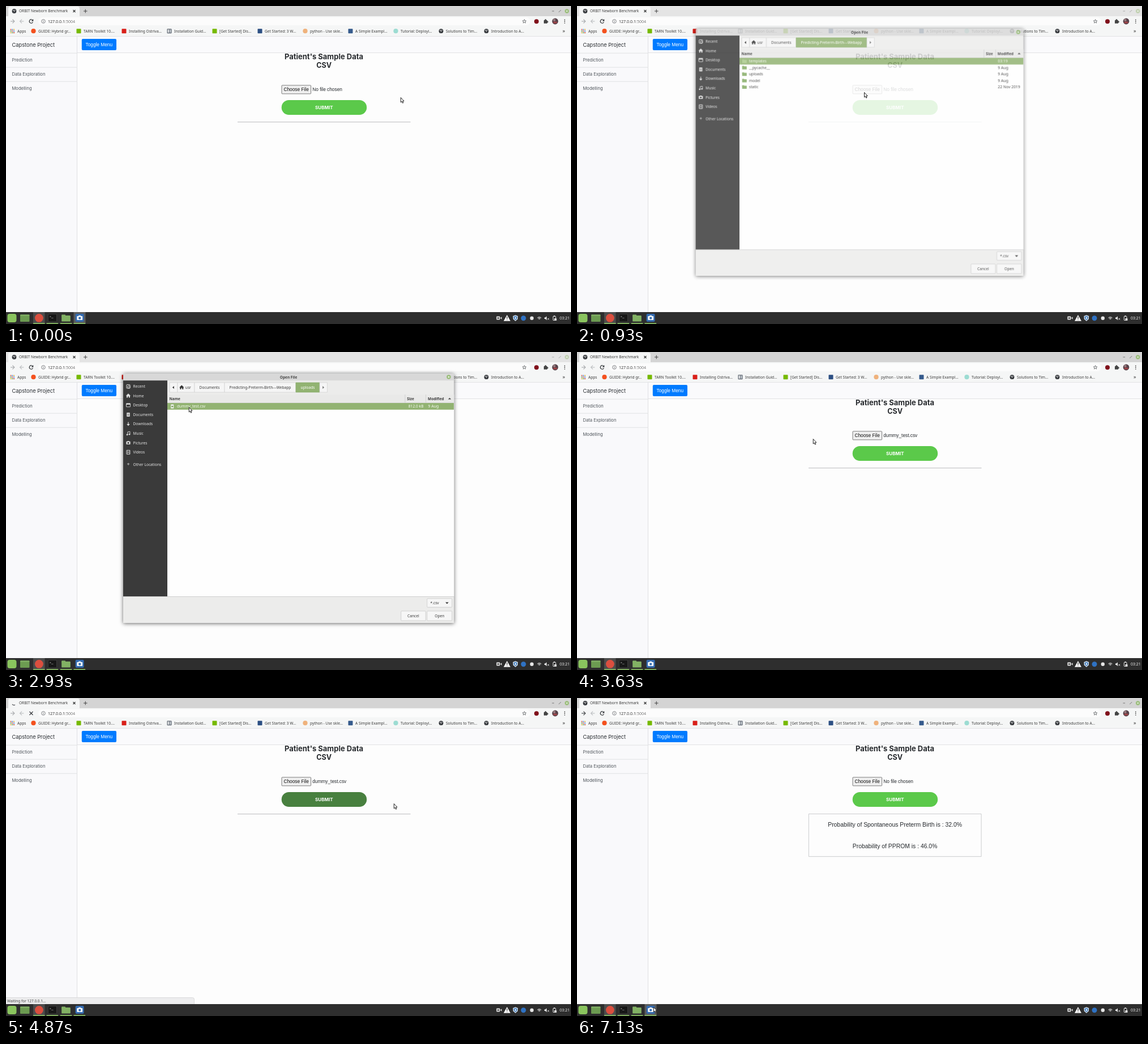
Animation of 998x561 px, one loop 7210 ms. Source, as an HTML page with a canvas:

```html
<!DOCTYPE html>
<html lang="en">
<head>
<meta charset="utf-8">
<title>Sample upload</title>
<style>
html, body { margin: 0; width: 100%; height: 100%; overflow: hidden; background: #fdfdfd; }
canvas { display: block; width: 998px; height: 561px; }
</style>
</head>
<body>
<canvas id="stage" width="998" height="561"></canvas>
<script>
const W = 998, H = 561, LOOP = 7210;
const UI = '"Noto Sans", sans-serif';
const GEO = 'Inter, sans-serif';
const PAGE = '"Liberation Sans", Arial, sans-serif';
const GREEN = '#92b372', INK = '#3c3c3c';

const screen = document.getElementById('stage').getContext('2d');
const layer = document.createElement('canvas');
layer.width = W;
layer.height = H;
const layerCtx = layer.getContext('2d');
let g = screen;

const clamp = v => Math.max(0, Math.min(1, v));
const progress = (t, from, length) => clamp((t - from) / length);
const smooth = p => p * p * (3 - 2 * p);
const easeOut = p => 1 - (1 - p) ** 2;

function rect(x, y, w, h, fill, r = 0, stroke, lineWidth = 0.7) {
  g.beginPath();
  g.roundRect(x, y, w, h, r);
  if (fill) { g.fillStyle = fill; g.fill(); }
  if (stroke) { g.strokeStyle = stroke; g.lineWidth = lineWidth; g.stroke(); }
}

function disc(x, y, r, fill) {
  g.beginPath();
  g.arc(x, y, r, 0, 7);
  g.fillStyle = fill;
  g.fill();
}

function ring(x, y, r, color, width = 1, from = 0, to = 2 * Math.PI) {
  g.beginPath();
  g.arc(x, y, r, from, to);
  g.strokeStyle = color;
  g.lineWidth = width;
  g.stroke();
}

// Points are offsets from (x, y); a fill closes the shape.
function path(x, y, points, { fill, stroke, width = 1 }) {
  g.beginPath();
  for (let i = 0; i < points.length; i += 2) g.lineTo(x + points[i], y + points[i + 1]);
  if (fill) { g.closePath(); g.fillStyle = fill; g.fill(); }
  if (stroke) { g.strokeStyle = stroke; g.lineWidth = width; g.stroke(); }
}

// y is the middle of the capital letters.
function text(s, x, y, size, color = INK, { font = UI, weight = 400, align = 'left' } = {}) {
  g.font = `${weight} ${size}px ${font}`;
  g.textAlign = align;
  g.fillStyle = color;
  g.fillText(s, x, y + size * 0.355);
}

const cross = (x, y, r, color, width = 1) => {
  path(x, y, [-r, -r, r, r], { stroke: color, width });
  path(x, y, [-r, r, r, -r], { stroke: color, width });
};

function globe(x, y) {
  disc(x, y, 3.9, '#33363a');
  path(x, y, [-2.6, -1.2, -0.4, -1.4, 0.6, 0.3, -0.8, 1.7], { stroke: '#f4f4f4', width: 1 });
  path(x, y, [1, -2.4, 2.2, -0.6], { stroke: '#f4f4f4', width: 0.9 });
}

function arrow(x, y, dir, color) {
  path(x, y, [3.4 * dir, 0, -3.4 * dir, 0], { stroke: color, width: 1.1 });
  path(x, y, [0, -3.3, -3.4 * dir, 0, 0, 3.3], { stroke: color, width: 1.1 });
}

const bookmarks = [
  ['GUIDE: Hybrid gr…', '#f4511e', 'disc'],
  ['TARN Toolkit 10.…', '#76b900', 'box'],
  ['Installing Ostriva…', '#d9201a', 'box'],
  ['Installation Guid…', '#5d6570', 'doc'],
  ['[Get Started] Dis…', '#76b900', 'box'],
  ['Get Started: 3 W…', '#2c4f83', 'box'],
  ['python - Use skle…', '#efb27c', 'disc'],
  ['A Simple Exampl…', '#355a8c', 'box'],
  ['Tutorial: Deployi…', '#9cdcd2', 'disc'],
  ['Solutions to Tim…', '', 'globe'],
  ['Introduction to A…', '', 'globe']
];

function drawBookmark([label, color, kind], i) {
  const x = 48.5 + 80 * i, y = 44.2;
  if (kind === 'disc') disc(x, y, 4.1, color);
  else if (kind === 'globe') globe(x, y);
  else rect(x - 4, y - 4, 8, 8, color, 0.8);
  if (kind === 'doc') {
    rect(x - 2.8, y - 2.8, 2.2, 5.6, '#f0f0f0');
    rect(x + 0.4, y - 2.8, 2.4, 5.6, '#c4cad0');
  }
  text(label, x + 8.5, y, 6.6);
}

function drawBrowser(s) {
  rect(0, 0, W, 18, s.active ? '#d4d4d4' : '#e4e4e4');
  rect(4, 1, 126, 20, '#f5f6f6', [4, 4, 0, 0]);
  rect(0, 18, W, 36, '#f5f6f6');
  if (s.loading) {
    const a = -s.t / 160;
    ring(14, 9, 3.6, '#45484c', 1.1, a, a + 1.6);
  } else globe(14.5, 9);
  text('ORBIT Newborn Benchmark', 23, 9, 6.55);
  cross(120.5, 9, 2, '#333', 1.1);
  path(140.3, 9, [-3.3, 0, 3.3, 0], { stroke: '#444' });
  path(140.3, 9, [0, -3.3, 0, 3.3], { stroke: '#444' });

  const tool = s.active ? '#777' : '#aaa';
  path(966.3, 9, [-1.8, 0, 1.8, 0], { stroke: tool });
  path(978.3, 9, [-2, 2, 2, -2], { stroke: tool });
  disc(990.7, 9, 3.7, s.active ? '#98bc78' : '#bfcfb0');
  cross(990.7, 9, 1.4, '#fff', 0.9);

  arrow(11.5, 27, -1, s.done ? '#3a3d40' : '#a5a7a9');
  arrow(28, 27, 1, '#bcbec0');
  if (s.loading) cross(44.5, 27, 3, '#3a3d40', 1.2);
  else {
    ring(44.5, 27, 3.2, '#3a3d40', 1.2, 0.4, 5.5);
    path(48.3, 23, [0, 0, 0, 3.7, -3.7, 3.7], { fill: '#3a3d40' });
  }
  rect(57, 20, 869, 14, '#fcfcfc', 7);
  ring(66, 27, 3.3, '#65686b', 0.8);
  rect(65.6, 26.4, 0.9, 2.4, '#65686b');
  rect(65.6, 24.9, 0.9, 0.9, '#65686b');
  text('127.0.0.1', 74, 27, 7.1, '#333');
  g.font = `7.1px ${UI}`;
  text(':5004', 74 + g.measureText('127.0.0.1').width, 27, 7.1, '#777');

  const star = [];
  for (let i = 0; i <= 10; i++) {
    const r = i % 2 ? 1.5 : 3.5, a = i * Math.PI / 5 - Math.PI / 2;
    star.push(r * Math.cos(a), r * Math.sin(a));
  }
  path(915.6, 27.2, star, { stroke: '#55585b', width: 0.8 });
  disc(937, 27.2, 4, '#800f1b');
  rect(950, 25, 6, 5.8, '#444', 0.6);
  disc(953, 24.6, 1.4, '#444');
  disc(956.4, 28, 1.4, '#444');
  disc(970, 27, 5.4, '#55424a');
  disc(968.5, 24.8, 2.2, '#9a7c80');
  rect(966.5, 27.5, 7, 3, '#a24448', 1.5);
  for (const y of [24.4, 27.2, 30]) disc(986.8, y, 0.85, '#444');

  const appColors = ['#d95140', '#4c8bf5', '#e2b33c', '#58a55c'];
  for (let i = 0; i < 9; i++)
    rect(7.6 + (i % 3) * 2.8, 40.6 + Math.floor(i / 3) * 2.8, 1.9, 1.9, appColors[i % 4]);
  text('Apps', 20, 44.2, 6.6);
  bookmarks.forEach(drawBookmark);
  text('»', 983, 43.5, 9, '#333');
}

function drawPage(s) {
  rect(0, 54, W, 486, '#fdfdfd');
  rect(0, 54, 125, 486, '#f9f9fb');
  rect(126, 54, W - 126, 28, '#fafafc');
  rect(0, 53.3, W, 0.7, '#dcdddf');
  rect(125, 54, 0.8, 486, '#d8d9dc');
  rect(126, 82, W - 126, 0.8, '#d8d9dc');
  for (const y of [82.8, 107.8, 132.8]) rect(0, y, 125, 0.8, '#d8d9dc');

  text('Capstone Project', 10.5, 68.7, 9.3, '#2b2f33', { font: GEO });
  ['Prediction', 'Data Exploration', 'Modelling'].forEach((label, i) =>
    text(label, 10.5, 95.8 + 25 * i, 7.6, '#50565c', { font: GEO }));
  rect(133.8, 58, 61.2, 20, '#007bff', 2);
  text('Toggle Menu', 164.3, 68, 8.32, '#fff', { font: PAGE, align: 'center' });

  const heading = { font: GEO, weight: 700, align: 'center' };
  text("Patient's Sample Data", 561.5, 89.7, 13, '#26292d', heading);
  text('CSV', 561.7, 104.2, 12.6, '#26292d', heading);
  rect(487, 139.9, 51.6, 15, '#efefef', 1, '#6f6f6f', 0.9);
  text('Choose File', 512.6, 147.3, 8.32, '#111', { font: PAGE, align: 'center' });
  text(s.fileName, 541.2, 147.3, 8.32, '#24282c', { font: PAGE });

  const mix = (a, b) => Math.round(a + (b - a) * s.hover);
  rect(486.7, 166, 150.5, 26, `rgb(${mix(91, 51)},${mix(201, 51)},${mix(74, 51)})`, 13);
  text('SUBMIT', 561.8, 179, 8, '#fff', heading);

  if (s.done) {
    rect(409.3, 204.5, 304.8, 75.2, null, 0, '#c6c7c9', 0.9);
    const result = { font: PAGE, align: 'center' };
    text('Probability of Spontaneous Preterm Birth is : 32.0%', 561.6, 223.6, 10.4, '#24282c', result);
    text('Probability of PPROM is : 46.0%', 561.6, 261, 10.4, '#24282c', result);
  } else rect(409, 204, 305.5, 1.2, '#c6c7c9');

  if (s.waiting) {
    rect(-3, 528.6, 335.5, 14, '#ededee', 3, '#d0d0d2');
    text('Waiting for 127.0.0.1…', 2, 534.7, 6.5, '#444');
  }
}

function camera(x, y, k, color, lens) {
  rect(x - 4 * k, y - 2.6 * k, 8 * k, 5.6 * k, color, 0.8 * k);
  rect(x - 1.6 * k, y - 3.6 * k, 3.2 * k, 1.6 * k, color);
  disc(x, y + 0.2 * k, 1.7 * k, lens);
}

function folder(x, y, k, color) {
  rect(x - 4 * k, y - 3.2 * k, 3.5 * k, 2 * k, color, 0.5 * k);
  rect(x - 4 * k, y - 2.4 * k, 8 * k, 5.4 * k, color, 0.6 * k);
}

function drawTaskbar(s) {
  rect(0, 540, W, 21, '#2e2e2e');
  rect(48, 540, 20.5, 21, '#4d4d4d');
  if (s.recorderLit) rect(119.5, 540, 21, 21, '#5b5b5b');
  rect(2.5, 543, 16, 15, '#8ac45e', 4);
  rect(25, 544.5, 16.5, 12.5, '#6c9b51', 1);
  rect(25, 544.5, 16.5, 2.2, '#82b066', 1);
  disc(58.4, 550.4, 7.4, '#db4f3f');
  rect(74.5, 543.5, 15, 13.5, '#171717', 1.5, '#484848');
  text('>_', 76.5, 547.4, 6, '#ddd', { font: '"Noto Sans Mono", monospace' });
  folder(106, 550.7, 1.95, '#82b164');
  rect(122.6, 543, 15, 14, '#346bb0', 2);
  camera(130.2, 550.3, 1.25, '#f2f5f8', '#346bb0');
  for (const x of [48, 71.5, 95.8, 119.5]) rect(x, 559.2, 20.6, 1.8, '#86b862');

  const tray = '#e6e6e6';
  rect(866.4, 547.5, 6, 6, tray, 0.7);
  path(873, 550.5, [0, 0, 2.6, -2.2, 2.6, 2.2], { fill: tray });
  disc(869.4, 550.5, 1.5, '#444');
  path(885, 550.5, [0, -5.5, 6, 5.3, -6, 5.3], { fill: '#fff' });
  rect(884.5, 548, 1.1, 4, '#222');
  rect(884.5, 553.2, 1.1, 1.1, '#222');
  path(899.8, 550.7, [0, -5.4, 4.4, -3.7, 4, 1.5, 0, 5.2, -4, 1.5, -4.4, -3.7], { fill: '#d5e2ee' });
  path(899.8, 550.7, [0, -4, 3, -2.7, 2.6, 1, 0, 3.6, -2.6, 1, -3, -2.7], { fill: '#3e79ba' });
  rect(898.9, 548.6, 1.8, 3.5, '#fff');
  disc(914, 550.7, 4.5, '#2f72c4');
  disc(928.8, 550.7, 3.2, tray);
  for (const r of [1.6, 3.3, 5]) ring(942, 553.7, r, tray, 1, -2.35, -0.8);
  path(951, 550.7, [0, -1.2, 1.7, -1.2, 4, -3.5, 4, 3.5, 1.7, 1.2, 0, 1.2], { fill: tray });
  cross(957.8, 552.2, 1.4, tray, 0.9);
  rect(966.3, 547.5, 4.7, 7, null, 0.7, tray, 1);
  rect(967.5, 546.2, 2.3, 1.2, tray);
  rect(968.5, 551, 4, 4, tray, 0.6);
  text('03:21', 978, 551, 6.9, '#f0f0f0');
}

const places = ['Recent', 'Home', 'Desktop', 'Documents', 'Downloads', 'Music', 'Pictures', 'Videos'];

function home(x, y, color) {
  path(x, y, [0, -3.9, 4.2, 0, 3, 0, 3, 3.3, 0.9, 3.3, 0.9, 1, -0.9, 1, -0.9, 3.3, -3, 3.3, -3, 0, -4.2, 0], { fill: color });
}

function placeIcon(i, x, y) {
  const c = '#dedede', hole = '#3a3a3a';
  const icons = [
    () => { rect(x - 3, y - 3, 6, 6.4, null, 0.6, c, 1); ring(x + 1, y + 1, 2, c); },
    () => home(x, y, c),
    () => { rect(x - 3.5, y - 3, 7, 6, null, 0.5, c, 0.9); rect(x - 3.5, y - 3, 7, 2, c); },
    () => { rect(x - 2.8, y - 3.5, 5.6, 7, c, 0.6); rect(x - 1.6, y - 1, 3.2, 0.7, hole); rect(x - 1.6, y + 1, 3.2, 0.7, hole); },
    () => { rect(x - 0.6, y - 3.4, 1.2, 4, c); path(x, y, [-2.8, 0, 2.8, 0, 0, 3.4], { fill: c }); },
    () => {
      disc(x - 2, y + 2.3, 1.3, c); disc(x + 2, y + 1.7, 1.3, c);
      path(x, y, [-1.1, 2.3, -1.1, -2.6, 2.9, -3.2, 2.9, 1.7], { stroke: c, width: 0.9 });
    },
    () => camera(x, y, 0.9, c, hole),
    () => {
      rect(x - 3, y - 3.5, 6, 7, null, 0.3, c, 0.9);
      for (const dx of [-1.4, 1.4]) rect(x + dx - 0.3, y - 3.5, 0.6, 7, c);
      rect(x - 1.4, y - 0.4, 2.8, 0.8, c);
    }
  ];
  icons[i]();
}

function drawCrumbs(inUploads) {
  const crumbs = [['', 289, 14], ['usr', 303, 30], ['Documents', 333, 53], ['Predicting-Preterm-Birth---Webapp', 386, 126]];
  if (inUploads) crumbs.push(['uploads', 512, 42]);
  const current = crumbs.length - 1;
  const end = inUploads ? 554 : 512;
  crumbs.push(['', end, 13.5]);
  crumbs.forEach(([label, x, w], i) => {
    const on = i === current;
    rect(x, 54, w, 17, on ? GREEN : '#f5f5f5', 0, on ? '#86a967' : '#cfcfcf');
    const offset = i === 1 ? 3.8 : 0;
    text(label, x + w / 2 + offset, 62.5, 6.65, on ? '#fff' : INK, { align: 'center' });
  });
  home(310.3, 62.5, '#333');
  path(295.5, 62.5, [1.3, -2.6, 1.3, 2.6, -1.6, 0], { fill: '#333' });
  path(end + 6.5, 62.5, [-1.3, -2.6, -1.3, 2.6, 1.6, 0], { fill: '#777' });
}

function drawFiles(s) {
  const sizeX = s.inUploads ? 704.5 : 720.5;
  rect(285, 75, 506, 14.5, '#e9e9e8');
  rect(285, 89.3, 506, 0.7, '#d0d0d0');
  const bold = { weight: 600 };
  text('Name', 288.5, 82.3, 6.5, INK, bold);
  text('Size', sizeX + 3.7, 82.3, 6.5, INK, bold);
  text('Modified', 745, 82.3, 6.5, INK, bold);
  path(783.6, 82.3, [-2.7, 1.3, 2.7, 1.3, 0, -1.6], { fill: '#444' });
  for (const x of [sizeX, 741.3]) rect(x, 75, 0.8, 14.5, '#cacaca');

  const rows = s.inUploads
    ? [['dummy_test.csv', '9 Aug', '812.0 kB']]
    : [['templates', '03:19'], ['__pycache__', '9 Aug'], ['uploads', '9 Aug'], ['model', '9 Aug'], ['static', '22 Nov 2019']];
  rows.forEach(([name, date, size], i) => {
    const y = 96 + 11.5 * i, on = i === s.selected;
    if (on) rect(285, y - 5.9, 506, 11.6, GREEN);
    const color = on ? '#f8fbf4' : INK;
    if (size) {
      rect(291.2, y - 3.4, 5, 7, '#f3f3f3', 0.4);
      rect(292.2, y - 1.2, 3, 2.6, '#7fa263');
      text(size, 737.5, y, 6.7, color, { align: 'right' });
    } else folder(293.8, y, 1.02, on ? '#a9c98b' : '#86ad66');
    text(name, 302, y, 6.65, color);
    text(date, 745.5, y, 6.9, color);
  });
}

function drawDialog(s) {
  g.shadowColor = 'rgba(0,0,0,.6)';
  g.shadowBlur = 7;
  g.shadowOffsetY = 1;
  rect(207, 38, 584.3, 440, '#ececeb', [3, 3, 0, 0]);
  g.shadowColor = 'transparent';
  rect(207, 38, 584.3, 12.3, '#d8d8d8', [3, 3, 0, 0]);
  text('Open File', 499, 44.4, 6.5, '#444', { weight: 700, align: 'center' });
  disc(782, 44, 3.7, '#98bc78');
  disc(782, 44, 1.5, '#e8f0e0');

  rect(285, 75, 506.3, 356, '#fefefe');
  rect(207, 50.3, 78, 381, '#3a3a3a');
  places.forEach((label, i) => {
    const y = 60.6 + 16.6 * i;
    placeIcon(i, 216, y);
    text(label, 224.5, y, 6.65, '#e4e4e4');
  });
  text('+', 216, 198, 9, '#e4e4e4', { align: 'center' });
  text('Other Locations', 224.5, 198.3, 6.65, '#e4e4e4');

  drawCrumbs(s.inUploads);
  drawFiles(s);

  rect(207, 431, 584.3, 0.8, '#c8c8c8');
  const button = (x, y, w, h) => rect(x, y, w, h, '#f6f6f6', 1, '#c4c4c4');
  button(743.8, 435, 44, 15.3);
  text('*.csv', 749.5, 442.8, 6.65);
  path(779, 442.8, [-2.8, -1.3, 2.8, -1.3, 0, 1.8], { fill: '#333' });
  button(697.8, 457, 43.5, 17);
  button(743.8, 457, 44, 17);
  text('Cancel', 719.3, 465.7, 6.65, INK, { align: 'center' });
  text('Open', 765.8, 465.7, 6.65, INK, { align: 'center' });
}

function compositeDialog(s) {
  if (s.dialog <= 0) return;
  g = layerCtx;
  g.clearRect(0, 0, W, H);
  drawDialog(s);
  g = screen;
  const scale = 0.94 + 0.06 * s.dialog;
  g.save();
  g.globalAlpha = s.dialog;
  g.translate(499, 258);
  g.scale(scale, scale);
  g.drawImage(layer, -499, -258);
  g.restore();
}

// Pointer stops: time, x, y.
const stops = [
  [0, 697, 161], [60, 697, 161], [680, 508, 152], [1050, 507, 152], [1560, 316, 131],
  [1670, 315, 130], [1880, 316, 118], [2220, 317, 118], [2620, 323, 97], [3290, 323, 97],
  [3930, 494, 199], [4230, 562, 182], [4600, 570, 183], [4870, 685, 186], [5200, 686, 188],
  [6110, 681, 187], [6830, 135, 536], [7130, 135, 545], [LOOP, 135, 545]
];

function drawPointer(t) {
  const i = stops.findIndex(stop => stop[0] > t);
  const [t0, x0, y0] = stops[i - 1], [t1, x1, y1] = stops[i];
  const p = smooth((t - t0) / (t1 - t0));
  path(x0 + (x1 - x0) * p, y0 + (y1 - y0) * p,
    [0.3, 0.5, 0.3, 9, 2.2, 7.3, 3.6, 10.3, 4.9, 9.6, 3.6, 6.8, 6, 6.6, 0.3, 0.5],
    { fill: '#fff', stroke: '#222', width: 1 });
}

function stateAt(t) {
  const open = easeOut(progress(t, 840, 150));
  const closed = easeOut(progress(t, 3360, 130));
  const inUploads = t >= 2150;
  const done = t >= 5180;
  return {
    t, inUploads, done,
    active: t < 840 || t >= 3400,
    dialog: open * (1 - closed),
    selected: !inUploads && t >= 1950 ? 2 : 0,
    fileName: t >= 3380 && !done ? 'dummy_test.csv' : 'No file chosen',
    hover: done ? 0 : easeOut(progress(t, 4040, 400)) * (1 - easeOut(progress(t, 4750, 400))),
    loading: t >= 4500 && !done,
    waiting: t >= 4620 && t < 5110,
    recorderLit: t < 100 || t >= 6850
  };
}

function draw(t) {
  const s = stateAt(t);
  drawBrowser(s);
  drawPage(s);
  drawTaskbar(s);
  compositeDialog(s);
  drawPointer(t);
}

const start = performance.now();
function tick() {
  draw((performance.now() - start) % LOOP);
  requestAnimationFrame(tick);
}
tick();
</script>
</body>
</html>
```
